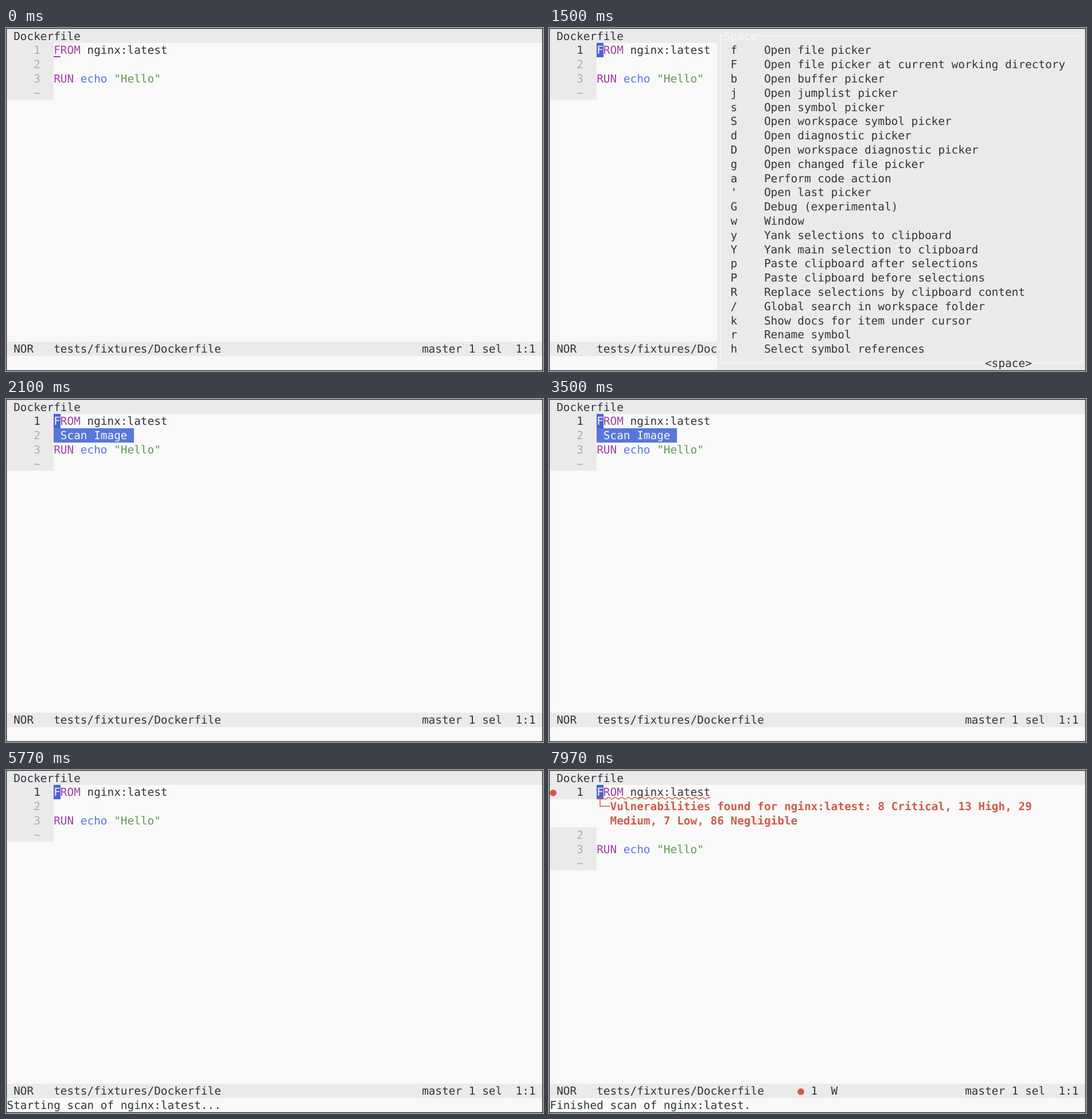
An HTML page with a canvas that plays this animation: 936 by 598 pixels, repeating every 8000 ms.

```html
<!DOCTYPE html>
<html lang="en">
<head>
<meta charset="utf-8">
<title>Editor scan</title>
<style>
html, body { margin: 0; width: 100%; height: 100%; overflow: hidden; }
canvas { display: block; }
</style>
</head>
<body>
<canvas id="stage" width="936" height="598"></canvas>
<script>
const ctx = document.getElementById('stage').getContext('2d');
const W = 936, H = 598, LOOP = 8000;
const CELL = 11.668, ROW = 24.8, LEFT = 1.5, TOP = 1.2;
const FONT = '19.38px "DejaVu Sans Mono", monospace';

const BG = '#f9f9f9', PANEL = '#eaeaeb', INK = '#33343b', DIM = '#adadb1',
  PURPLE = '#9b42a3', BLUE = '#5877db', CURSOR = '#4b60d6', GREEN = '#639a52',
  RED = '#cc5c4a', PALE = '#f7f7f7';

// Moments (ms) at which the screen switches
const FOCUS = 900, SPACE = 1300, ACTIONS = 1900, START = 3830, DONE = 7570;

const MENU = `f Open file picker
F Open file picker at current working directory
b Open buffer picker
j Open jumplist picker
s Open symbol picker
S Open workspace symbol picker
d Open diagnostic picker
D Open workspace diagnostic picker
g Open changed file picker
a Perform code action
' Open last picker
G Debug (experimental)
w Window
y Yank selections to clipboard
Y Yank main selection to clipboard
p Paste clipboard after selections
P Paste clipboard before selections
R Replace selections by clipboard content
/ Global search in workspace folder
k Show docs for item under cursor
r Rename symbol
h Select symbol references`.split('\n');

const colX = c => LEFT + c * CELL;
const rowY = r => TOP + r * ROW;

function text(col, row, str, color = INK, bold = false) {
  ctx.fillStyle = color;
  ctx.font = (bold ? 'bold ' : '') + FONT;
  [...str].forEach((ch, i) => ctx.fillText(ch, colX(col + i), rowY(row) + 19.3));
}

function cells(col, row, cols, rows, color) {
  const x = Math.round(colX(col)), y = Math.round(rowY(row));
  ctx.fillStyle = color;
  ctx.fillRect(x, y, Math.round(colX(col + cols)) - x, Math.round(rowY(row + rows)) - y);
}

function line(points, color, width = 1.5) {
  ctx.strokeStyle = color;
  ctx.lineWidth = width;
  ctx.beginPath();
  points.forEach(([x, y]) => ctx.lineTo(x, y));
  ctx.stroke();
}

function dot(col, row) {
  ctx.fillStyle = RED;
  ctx.beginPath();
  ctx.arc(colX(col + 0.5), rowY(row) + 14, 5.8, 0, 2 * Math.PI);
  ctx.fill();
}

function editor(focused, done) {
  const shift = done ? 2 : 0;
  cells(0, 0, 80, 1, PANEL);
  text(1, 0, 'Dockerfile');
  cells(0, 1, 7, 1, PANEL);
  cells(0, 2 + shift, 7, 3, PANEL);

  text(4, 1, '1', focused ? INK : DIM);
  text(4, 2 + shift, '2', DIM);
  text(4, 3 + shift, '3', DIM);
  text(4, 4 + shift, '~', DIM);

  if (focused) cells(7, 1, 1, 1, CURSOR);
  else line([[83, 50], [95, 50]], PURPLE, 2);
  text(7, 1, 'F', focused ? BG : PURPLE);
  text(8, 1, 'ROM', PURPLE);
  text(12, 1, 'nginx:latest');
  text(7, 3 + shift, 'RUN', PURPLE);
  text(11, 3 + shift, 'echo', BLUE);
  text(16, 3 + shift, '"Hello"', GREEN);

  cells(0, 22, 80, 1, PANEL);
  text(1, 22, 'NOR');
  text(7, 22, 'tests/fixtures/Dockerfile');
  text(62, 22, 'master 1 sel');
  text(76, 22, '1:1');
}

function spaceMenu() {
  cells(25, 0, 55, 24, PANEL);
  const l = colX(25.5), r = colX(79.5), t = rowY(0.5), b = rowY(23.5);
  line([[colX(26), t], [l, t], [l, b], [colX(65), b]], PALE);
  line([[colX(31), t], [r, t], [r, b], [colX(72), b]], PALE);
  text(26, 0, 'Space', PALE);
  MENU.forEach((item, i) => {
    text(27, i + 1, item[0]);
    text(32, i + 1, item.slice(2));
  });
  text(65, 23, '<space>');
}

function diagnostics() {
  const wave = [];
  for (let x = colX(7); x <= colX(24); x++)
    wave.push([x, 49.2 + 1.5 * Math.sin((x - LEFT) / CELL * 2 * Math.PI)]);
  line(wave, RED, 1.4);
  line([[colX(7.5), rowY(2)], [colX(7.5), rowY(2.5)], [colX(9), rowY(2.5)]], RED);
  text(9, 2, 'Vulnerabilities found for nginx:latest: 8 Critical, 13 High, 29', RED, true);
  text(9, 3, 'Medium, 7 Low, 86 Negligible', RED, true);
  dot(0, 1);
  dot(37, 22);
  text(39, 22, '1');
  text(42, 22, 'W');
}

function draw(t) {
  const done = t >= DONE;
  ctx.fillStyle = BG;
  ctx.fillRect(0, 0, W, H);
  editor(t >= FOCUS, done);

  if (t >= SPACE && t < ACTIONS) spaceMenu();
  if (t >= ACTIONS && t < START) {
    cells(7, 2, 12, 1, BLUE);
    text(8, 2, 'Scan Image', BG);
  }
  if (done) diagnostics();
  if (t >= START) text(0, 23, done ? 'Finished scan of nginx:latest.' : 'Starting scan of nginx:latest...');

  ctx.strokeStyle = '#28282c';
  ctx.lineWidth = 1.5;
  ctx.strokeRect(0.6, 0.6, W - 1.2, H - 1.2);
}

ctx.textRendering = 'geometricPrecision';
const begin = performance.now();
(function tick() {
  draw((performance.now() - begin) % LOOP);
  requestAnimationFrame(tick);
})();
</script>
</body>
</html>
```
